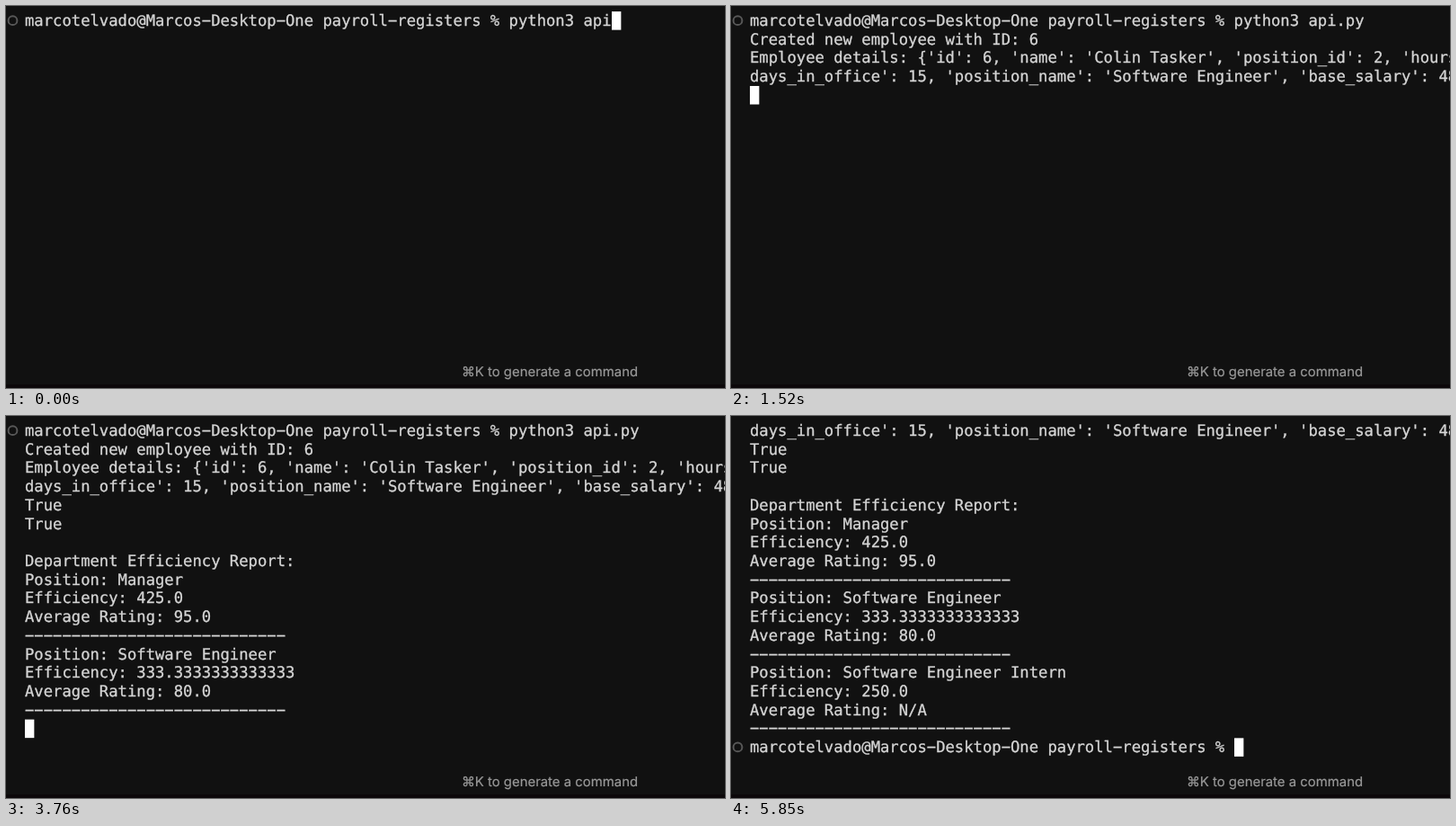
These frames come from a looping animation (800x425 px, 5.88 s). An HTML page:

```html
<!DOCTYPE html>
<html lang="en">
<head>
<meta charset="utf-8">
<title>Terminal run</title>
<style>
  html, body { margin: 0; width: 100%; height: 100%; overflow: hidden; background: #111; }
  svg { display: block; }
  text { text-rendering: geometricPrecision; white-space: pre; }
  .row { font: 17.217px "DejaVu Sans Mono", monospace; fill: #d6d6d6; stroke: #d6d6d6; stroke-width: 0.3; }
  .hint { font: 14.9px Inter, "DejaVu Sans", sans-serif; fill: #999; stroke: #999; stroke-width: 0.2; text-anchor: middle; }
  .mark { fill: none; stroke: #585858; stroke-width: 2; }
</style>
</head>
<body>
<svg id="stage" width="800" height="425" viewBox="0 0 800 425">
  <rect width="800" height="425" fill="#111"/>
  <rect y="421" width="800" height="4" fill="#0c080a"/>
  <text class="hint" x="605" y="412">⌘K to generate a command</text>
</svg>
<script>
const LOOP = 5880;
const LEFT = 21, TOP = 6.1, COL = 10.365, ROW = 20.72, ROWS = 18;
const PROMPT = "marcotelvado@Marcos-Desktop-One payroll-registers % ";
const RULE = "-".repeat(28);

const report = (position, efficiency, rating) => [
  "Position: " + position,
  "Efficiency: " + efficiency,
  "Average Rating: " + rating,
  RULE
];

// Each step adds text to the end of the output at its time.
const steps = [
  [0, PROMPT + "python3 api"],
  [210, "."],
  [330, "p"],
  [420, "y"],
  [570, "\n"],
  [730, "Created new employee with ID: 6\n"],
  [1240, "Employee details: {'id': 6, 'name': 'Colin Tasker', 'position_id': 2, 'hours\n" +
         "days_in_office': 15, 'position_name': 'Software Engineer', 'base_salary': 48\n"],
  [1750, "True\n"],
  [2250, "True\n"],
  [2760, ["", "Department Efficiency Report:", ...report("Manager", "425.0", "95.0"), ""].join("\n")],
  [3270, [...report("Software Engineer", "333.3333333333333", "80.0"), ""].join("\n")],
  [3790, [...report("Software Engineer Intern", "250.0", "N/A"), ""].join("\n")],
  [4300, PROMPT]
];

const stage = document.getElementById("stage");
function add(tag, attrs) {
  const el = document.createElementNS("http://www.w3.org/2000/svg", tag);
  for (const key in attrs) el.setAttribute(key, attrs[key]);
  return stage.appendChild(el);
}

const rows = Array.from({ length: ROWS }, (_, i) => ({
  mark: add("circle", { class: "mark", cx: 7.5, cy: TOP + i * ROW + 10.1, r: 4.9 }),
  text: add("text", { class: "row", x: LEFT, y: TOP + i * ROW + 15.8 })
}));
const cursor = add("rect", { width: COL, height: ROW - 0.2, fill: "#fff" });

function draw(count) {
  const lines = steps.slice(0, count).map(s => s[1]).join("").split("\n");
  const shown = lines.slice(-ROWS);
  rows.forEach(({ mark, text }, i) => {
    const line = shown[i] || "";
    text.textContent = line.replaceAll("-", "\u2212"); // long dashes
    mark.style.display = line.startsWith(PROMPT) ? "" : "none";
  });
  const last = shown.length - 1;
  cursor.setAttribute("x", LEFT + shown[last].length * COL);
  cursor.setAttribute("y", TOP + last * ROW);
}

const start = performance.now();
let drawn = 0;
function tick() {
  const t = (performance.now() - start) % LOOP;
  const count = steps.filter(s => s[0] <= t).length;
  if (count !== drawn) draw(drawn = count);
  requestAnimationFrame(tick);
}
tick();
</script>
</body>
</html>
```
